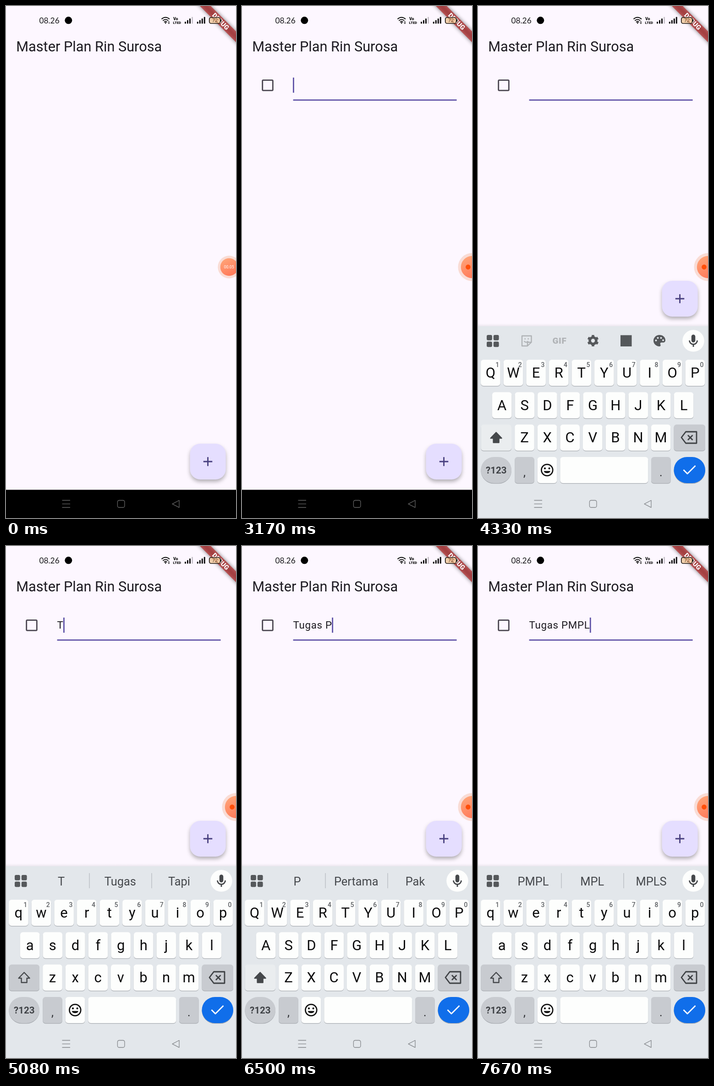
An HTML page for the animation above (8000 ms loop, 502 px wide and 1116 px high).

```html
<!DOCTYPE html>
<html lang="id">
<head>
<meta charset="utf-8">
<title>Master Plan</title>
<style>
  html, body { margin: 0; width: 100%; height: 100%; overflow: hidden; background: #fdf7ff; }
  svg { display: block; width: 502px; height: 1116px; }
  text { font-family: Roboto, sans-serif; white-space: pre; }
  .mid { text-anchor: middle; }
  .line { fill: none; stroke-linejoin: round; }
  .key { fill: #fdfefd; }
  .dim { fill: #c8cbd0; }
  .go { fill: #106eea; }
  .letter { font-size: 31px; fill: #0b0b0c; }
  .hint { font-size: 14px; font-weight: 500; fill: #5c5f63; }
  .word { font-size: 25.4px; fill: #45484c; }
  .ink { fill: #55585b; }
  .pale { stroke: #b0b3b6; stroke-width: 2.4; }
  #fab { filter: drop-shadow(0 5.5px 4.5px rgba(0, 0, 0, .29)); }
  #popup { filter: drop-shadow(0 1px 2px rgba(0, 0, 0, .4)); }
</style>
</head>
<body>
<svg viewBox="0 0 502 1116">
  <defs>
    <linearGradient id="coral" x1=".2" y1="0" x2=".7" y2="1">
      <stop offset="0" stop-color="#ffa579"/><stop offset="1" stop-color="#ff7758"/>
    </linearGradient>
    <linearGradient id="edge" x1="0" y1="0" x2="0" y2="1">
      <stop offset="0" stop-color="#000" stop-opacity="0"/><stop offset="1" stop-color="#000" stop-opacity=".07"/>
    </linearGradient>
    <clipPath id="fabClip"><rect x="401.6" y="954" width="78" height="78" rx="22.3"/></clipPath>
  </defs>
  <rect width="502" height="1116" fill="#fdf7ff"/>
  <text x="22.3" y="99" font-size="30.7" fill="#1c1a20">Master Plan Rin Surosa</text>

  <g id="task">
    <rect x="44.7" y="161.6" width="22.6" height="22.6" rx="1.6" class="line" stroke="#49454f" stroke-width="2.8"/>
    <rect id="rule" x="111.6" width="357"/>
    <text id="entry" x="111.6" y="180" font-size="22.3" letter-spacing=".7" fill="#1c1a20"></text>
    <rect id="caret" y="156" width="2.8" height="33" fill="#5f52a7"/>
  </g>

  <g id="fabBox">
    <rect id="fab" x="401.6" y="954" width="78" height="78" rx="22.3" fill="#e5deff"/>
    <circle id="ripple" cx="440.6" cy="993" fill="#473f8a" clip-path="url(#fabClip)"/>
    <path d="M430.8 993h19.5M440.6 983.2v19.6" stroke="#473f7f" stroke-width="2.8"/>
  </g>

  <!-- debug ribbon -->
  <g transform="translate(502 0) rotate(45)">
    <rect x="-90" y="39" width="180" height="16.8" fill-opacity=".5" style="filter:blur(4px)"/>
    <rect x="-90" y="39" width="180" height="16.8" fill="#b71c1c" fill-opacity=".63"/>
    <text class="mid" y="52.4" font-size="14.2" font-weight="900" fill="#fff">DEBUG</text>
  </g>

  <!-- status bar -->
  <text x="72.5" y="38" style="font:17.3px Lato,sans-serif" fill="#1a1a1c">08.26</text>
  <circle cx="136.3" cy="31.3" r="8"/>
  <path class="line" stroke="#111" stroke-width="2" d="M339.5 28.5q8.5-7.5 17.5 0M342.3 32q6-5 12 0M345 35.2q3.2-2.6 6.5 0"/>
  <circle cx="348.2" cy="37" r="1.5" fill="#111"/>
  <path d="M353.5 35.6l2-2.6 2 2.6zM353.5 36.8l2 2.6 2-2.6z" fill="#111"/>
  <g font-weight="900" fill="#111"><text x="365" y="30.5" font-size="8.8">Vo</text><text x="364.6" y="38.6" font-size="7.6">LTED</text></g>
  <g id="bars" fill="#111"></g>
  <rect x="443.8" y="25" width="24" height="13" rx="3.8" fill="#f3c796" fill-opacity=".75" stroke="#1d1712" stroke-width="1.7"/>
  <path d="M469.5 29v5" stroke="#1d1712" stroke-width="1.8"/>
  <text class="mid" x="456" y="35.3" font-size="10.5" fill="#6a4a2c">72</text>

  <rect id="navBar" y="1054.5" width="502" height="62"/>
  <g id="board"></g>
  <g id="nav" class="line" stroke-width="1.3">
    <path d="M122.5 1077.5h17.5M122.5 1085.3h17.5M122.5 1093h17.5"/>
    <rect x="243.4" y="1077.5" width="15.5" height="15.5" rx="3.6"/>
    <path d="M363 1085.3l15-7.8v15.6z"/>
  </g>

  <!-- recorder bubble -->
  <g id="bubble">
    <circle id="halo" cy="569" fill="#f9dcd5"/>
    <circle id="core" cy="569" fill="url(#coral)"/>
    <text id="clock" class="mid" x="486.7" y="572.3" font-size="8.7" fill="#fff"></text>
    <circle id="dot" cx="493.5" cy="569" r="5.4" fill="#ff4f0a"/>
  </g>
</svg>
<script>
const LOOP = 8000, PITCH = 49.6, RISE = 355;
const $ = id => document.getElementById(id);
const set = (id, attrs) => { for (const k in attrs) $(id).setAttribute(k, attrs[k]); };
const show = (id, on) => { $(id).style.display = on ? '' : 'none'; };

// Last value whose start time has passed
const at = (track, t) => track.reduce((v, [start, next]) => t >= start ? next : v, track[0][1]);

const rows = [['qwertyuiop', 27.4, 771], ['asdfghjkl', 52.2, 841.7], ['zxcvbnm', 101.5, 912.2]];
const spots = {};

function key(x, y, w, cls = 'key', r = 6, id = '') {
  return `<rect x="${x}" y="${y + 1.3}" width="${w}" height="57" rx="${r}" fill="#a9adb2"/>
    <rect ${id && `id="${id}"`} x="${x}" y="${y}" width="${w}" height="57" rx="${r}" class="${cls}"/>`;
}
function label(s, x, y, cls, more = '') {
  return `<text x="${x}" y="${y}" class="mid ${cls}" ${more}>${s}</text>`;
}

function letterKeys() {
  let out = '';
  rows.forEach(([chars, x0, y], row) => [...chars].forEach((c, i) => {
    const x = x0 + i * PITCH;
    spots[c] = [x, y];
    out += key(x - 21.3, y, 42.6) + label(c, x, y + 39, 'letter cap');
    if (!row) out += label((i + 1) % 10, x + 14.8, y + 16, 'hint');
  }));
  return out;
}

function tools() {
  return `<g id="tools">
    <path class="line pale" d="M96 719h20.500v14l-8.500 8h-12zM116 733h-8v8"/>
    <path class="line pale" d="M100.500 730.500q4.500 5 9 0M101.500 725.500h2.400M108.500 725.500h2.400"/>
    ${label('GIF', 178, 736, '', 'font-size="19" font-weight="800" letter-spacing=".6" fill="#b0b3b6"')}
    <circle class="line" cx="251" cy="729.5" r="7" stroke="#55585b" stroke-width="5.6"/>
    <circle class="line" cx="251" cy="729.5" r="10.500" stroke="#55585b" stroke-width="4" pathLength="12" stroke-dasharray="1 1" stroke-dashoffset="-.5"/>
    <rect class="ink" x="311" y="717.5" width="24.5" height="24.5"/>
    <path class="ink" d="M396 717a13 12.500 0 1 0 0 25c3 0 3-3 2-4.500c-1-2 0-4 3-4h3c3 0 5-2 5-5c0-7-6-11.500-13-11.500z"/>
    <g fill="#e3e7eb"><circle cx="388.5" cy="729" r="2"/><circle cx="392.5" cy="723.5" r="2"/><circle cx="399.5" cy="723.5" r="2"/><circle cx="404" cy="728.5" r="2"/></g>
  </g>`;
}

function buildBoard() {
  const grid = [[19, 717], [33.8, 717], [19, 731.5], [33.8, 731.5]]
    .map(([x, y]) => `<rect class="ink" x="${x}" y="${y}" width="11.8" height="11.8" rx="3"/>`).join('');
  $('board').innerHTML = `
    <rect y="692" width="502" height="6.5" fill="url(#edge)"/>
    <rect y="698" width="502" height="800" fill="#e3e7eb"/>
    ${grid}${tools()}
    <g id="words">
      ${[120.5, 249.3, 378].map(x => label('', x, 739.5, 'word')).join('')}
      <path d="M182 713v33M318 713v33" stroke="#b7bbc0" stroke-width="1.3"/>
    </g>
    <circle cx="470" cy="729.8" r="23.8" fill="#fdfefd"/>
    <g transform="translate(453 713.3) scale(1.42)" fill="#45484b">
      <rect x="9" y="2" width="6" height="12" rx="3"/>
      <path d="M17 11a5 5 0 0 1-10 0h-2a7 7 0 0 0 6 6.920v3.080h2v-3.080a7 7 0 0 0 6-6.920z"/>
    </g>
    ${letterKeys()}
    ${key(6.3, 912.2, 66.7, 'dim', 6, 'shiftKey')}
    <path id="arrow" d="M39.600 929.500l12 12.500h-6v9.500h-12v-9.500h-6z" stroke="#45484b" stroke-width="2.4" stroke-linejoin="round"/>
    ${key(427.5, 912.2, 68.5, 'dim')}
    <path class="line" d="M453.500 928h23.500v25h-23.500l-9.500-12.500zM458 935.500l10.500 10.500M468.500 935.500l-10.500 10.500" stroke="#3f4245" stroke-width="2.8"/>
    ${key(6.3, 983, 66.7, 'dim', 28.5)}
    ${label('?123', 39.8, 1018.5, '', 'font-size="20.5" font-weight="700" fill="#3f4246"')}
    ${key(80.2, 983, 42.6, 'dim')}${label(',', 101.5, 1025, '', 'font-size="25" fill="#2c2e31"')}
    ${key(129.7, 983, 42.6)}
    <g transform="translate(150.800 1011.500)" fill="#111">
      <circle class="line" r="12.4" style="fill:none" stroke="#111" stroke-width="2.7"/>
      <circle cx="-4.8" cy="-3.6" r="2.1"/><circle cx="4.8" cy="-3.6" r="2.1"/>
      <path d="M-7.200 2h14.400a7.400 6.300 0 0 1-14.400 0z"/>
    </g>
    ${key(179.3, 983, 192)}
    ${key(378, 983, 42.6, 'dim')}${label('.', 399.3, 1025, '', 'font-size="25" fill="#2c2e31"')}
    ${key(427.5, 983, 68.5, 'go', 28.5)}
    <path class="line" d="M448.500 1011l8.500 8.500 17.500-17.500" stroke="#fff" stroke-width="2.8"/>
    <g id="popup"><rect x="-26.5" y="-100" width="53" height="157" rx="6" class="dim"/>
      ${label('', 0, -47.5, '', 'id="popChar" font-size="34" fill="#0b0b0c"')}</g>`;
}

function buildBars() {
  [390, 416.8].forEach((x, n) => {
    for (let i = 0; i < 4; i++) {
      const h = 4.2 + i * 3.5;
      $('bars').innerHTML += `<rect x="${x + i * 5}" y="${38.5 - h}" width="3" height="${h}" rx="1" ${!n && i == 3 ? 'fill="#c9c4cc"' : ''}/>`;
    }
  });
}

// Timelines
const entry = [[0, ''], [5000, 'T'], [5330, 'Tu'], [5500, 'Tug'], [5830, 'Tugas'], [6080, 'Tugas '],
  [6500, 'Tugas P'], [6830, 'Tugas PM'], [7170, 'Tugas PMP'], [7500, 'Tugas PMPL']];
const words = [[0, ''], [5000, 'T Tugas Tapi'], [5330, 'Tu Tugas Tiga'], [5580, 'Tuga *Tugas Tiga'],
  [6500, 'P Pertama Pak'], [6830, 'PM Pertama Pak'], [7170, 'PMP MP MPL'], [7500, 'PMPL MPL MPLS']];
const caps = [[0, false], [4330, true], [5000, false], [6170, true], [6330, false], [6500, true],
  [6750, false], [6920, true], [7080, false], [7250, true], [7500, false]];
const press = [[0, ''], [4830, 'T'], [5000, ''], [5170, 'u'], [5330, ''], [5420, 'g'], [5500, ''], [5670, 's'],
  [5830, ''], [6330, 'P'], [6500, ''], [6670, 'M'], [6830, ''], [7000, 'P'], [7170, ''], [7330, 'L'], [7500, '']];
const caret = [[0, false], [3170, true], [3580, false], [3830, true], [4170, false], [4670, true]];
const drop = [[0, RISE], [3580, 190], [3670, 32], [3830, 9], [3920, 3], [4000, 0]];
const shrink = [[0, 0], [2330, .25], [2420, .5], [2500, .75], [2580, 1]];

let lastCaps, lastWords;

function drawBoard(t) {
  const up = at(caps, t), row = at(words, t), ch = at(press, t);
  if (up !== lastCaps) {
    document.querySelectorAll('.cap').forEach(el => {
      el.textContent = up ? el.textContent.toUpperCase() : el.textContent.toLowerCase();
    });
    $('shiftKey').style.fill = up ? '#eaedef' : '#c8cbd0';
    set('arrow', { fill: up ? '#45484b' : 'none' });
    lastCaps = up;
  }
  if (row !== lastWords) {
    show('words', row);
    show('tools', !row);
    const list = row.split(' ');
    document.querySelectorAll('.word').forEach((el, i) => {
      const w = list[i] || '';
      el.textContent = w.replace('*', '');
      el.style.fontWeight = w[0] === '*' ? 700 : 400;
    });
    lastWords = row;
  }
  show('popup', ch);
  if (ch) {
    const [x, y] = spots[ch.toLowerCase()];
    set('popup', { transform: `translate(${x} ${y})` });
    $('popChar').textContent = ch;
  }
}

function draw(t) {
  const y = at(drop, t), open = t >= 3580, focus = t >= 3170, s = at(shrink, t);
  show('board', open);
  show('navBar', !open);
  set('board', { transform: `translate(0 ${y})` });
  set('fabBox', { transform: `translate(0 ${y - RISE})` });
  set('nav', { stroke: open ? '#85888c' : '#646464' });

  const p = (t - 830) / 420, live = p > 0 && p < 1;
  set('ripple', { r: live ? 20 + 40 * p : 0, opacity: live ? .1 * Math.min(1, 2 - 2 * p) : 0 });

  show('task', t >= 1000);
  set('rule', focus ? { y: 203.6, height: 2.8, fill: '#5f52a7' } : { y: 205, height: 1.4, fill: '#7a757f' });
  const typed = at(entry, t);
  $('entry').textContent = typed;
  show('caret', at(caret, t));
  set('caret', { x: 111 + (typed ? $('entry').getComputedTextLength() : 0) });

  set('halo', { cx: 487 + 15 * s, r: 24.7 + 5.8 * s });
  set('core', { cx: 487 + 15 * s, r: 19.3 + 4.9 * s });
  $('clock').textContent = t < 1000 ? '00.05' : '00.06';
  set('clock', { opacity: 1 - s });
  set('dot', { opacity: s });
  drawBoard(t);
}

buildBoard();
buildBars();
const start = performance.now();
function tick() {
  draw((performance.now() - start) % LOOP);
  requestAnimationFrame(tick);
}
tick();
</script>
</body>
</html>
```
